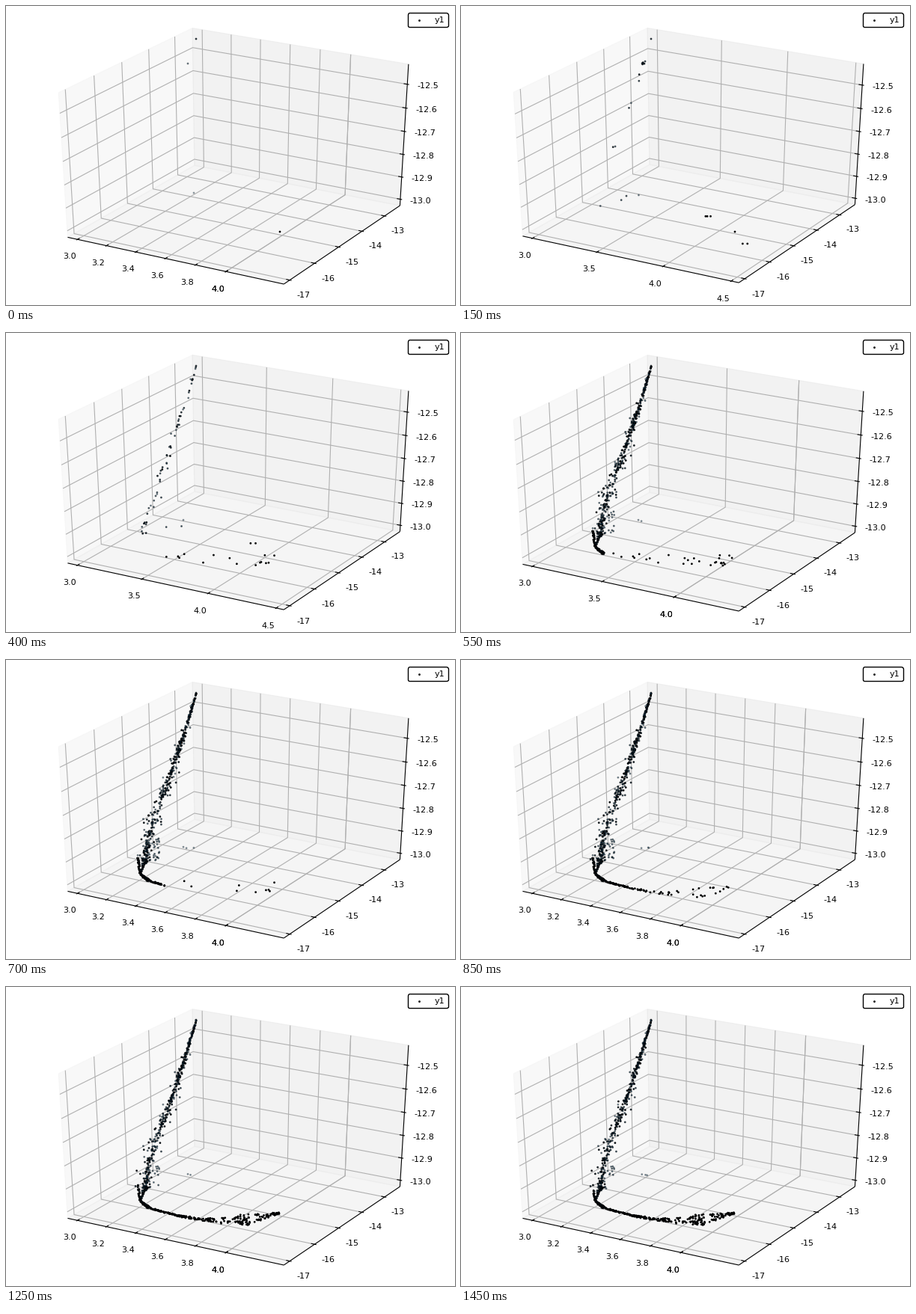
A matplotlib script for the animation above (1.5 s loop, 600 px wide and 400 px high).

```python
import numpy as np
import matplotlib.pyplot as plt
from matplotlib.animation import FuncAnimation
from matplotlib.collections import LineCollection
from matplotlib.patches import Polygon

W, H, FRAMES, STEP = 600, 400, 30, 50
MARGIN = 3.94           # one millimetre at 100 dpi
EDGE = 0.0472           # gap between the box and the data, as a share of the box
LABEL_GAP = 0.0623
DIST = 9.6
BLUE = (0, 0.606, 0.979)
TO_EYE = np.array([0.4330, -0.75, 0.5])
RIGHT = np.array([0.8660, 0.5, 0.0])
UP = np.array([-0.25, 0.4330, 0.8660])
PANES = [("0.95", [(0, 0, 0), (0, 1, 0), (0, 1, 1), (0, 0, 1)]),
         ("0.90", [(0, 1, 0), (1, 1, 0), (1, 1, 1), (0, 1, 1)]),
         ("0.925", [(0, 0, 0), (1, 0, 0), (1, 1, 0), (0, 1, 0)])]
AXES = [[(0, 0, 0), (1, 0, 0)], [(1, 0, 0), (1, 1, 0)], [(1, 1, 0), (1, 1, 1)]]

plt.rcParams["font.family"] = "DejaVu Sans"
rng = np.random.default_rng(7)

# ---- point cloud: rows of x, y, alpha, birth, death ----
cloud = []


def add(x, y, alpha, birth, death=FRAMES):
    cols = np.broadcast_arrays(x, y, alpha, birth, death)
    cloud.append(np.column_stack([np.ravel(c).astype(float) for c in cols]))


def spine(y):
    return np.interp(y, [44, 105, 160, 212, 245, 275],
                     [254.5, 236.5, 218, 198, 190, 184])


def add_upper(n, birth, death):
    """Slanted branch: a tight core inside a looser halo."""
    y = 44 + 230 * rng.random(n)
    spread = np.interp(y, [44, 90, 140, 220, 275], [0.3, 1.6, 3.2, 4.8, 3.5])
    spread *= np.where(rng.random(n) < 0.5, 0.4, 1.25)
    x = spine(y) + rng.normal(0, 1, n) * spread - 0.2 * spread
    add(x, y, rng.uniform(.45, .95, n), birth, death)


def add_early(x, y, alpha):
    n = len(x)
    add(x, y, alpha, rng.integers(1, 6, n), rng.integers(6, 11, n))


def add_bend():
    y = rng.uniform(265, 296, 70)
    x = np.interp(y, [265, 280, 288, 296], [176.5, 178, 181, 190])
    fading = np.where(y < 276, rng.uniform(14, 32, 70), FRAMES)
    add(x + rng.normal(0, .6, 70), y, .9, rng.uniform(8, 11, 70), fading)
    t = rng.random(35)
    add(189 - 9 * t + rng.normal(0, 1.2, 35), 266 + 17 * t, .8,
        rng.uniform(8, 11, 35))


def add_band():
    """Lower branch, filled outwards from the bend, then at random."""
    x = np.concatenate([rng.uniform(180, 235, 110), rng.uniform(235, 300, 85),
                        rng.uniform(300, 366, 105)])
    knots = [180, 195, 235, 262, 290, 322, 345, 366]
    low = np.interp(x, knots, [286, 297, 308, 313, 317, 319, 311, 303])
    high = np.interp(x, knots, [286, 296.5, 306, 310, 308, 304, 303, 301])
    n = len(x)
    birth = np.where(x < 235, 9 + 8 * (x - 180) / 55 + 2 * rng.random(n),
                     rng.uniform(14, 26, n))
    y = low + (high - low) * rng.random(n) + rng.normal(0, .3, n)
    add(x, y, np.clip(.85 + (x - 180) / 300, 0, 1), birth)


def add_far():
    n = 34
    add(rng.uniform(186, 205, n), rng.uniform(238, 270, n),
        rng.uniform(.38, .6, n), rng.uniform(8, 14, n), rng.uniform(14, 40, n))
    birth = np.arange(8, FRAMES, 3)
    add(rng.uniform(236, 251, len(birth)), rng.normal(251, .8, len(birth)),
        .4, birth, birth + 7)


add([254, 243, 251, 366], [44, 77, 250, 302], [.75, .5, .35, 1], 0,
    [FRAMES, 4, 3, 4])

y = np.concatenate([rng.normal(77, 3, 7), rng.uniform(46, 225, 11)])
add_early(spine(y) + rng.normal(0, 1.5, 18), y, rng.uniform(.45, .9, 18))
x = rng.uniform(172, 246, 14)
add_early(x, 264 - (x - 172) / 5 + rng.normal(0, 6, 14), rng.uniform(.4, .8, 14))
t = rng.integers(0, 4, 8) / 3
add_early(311 + 66 * t + rng.normal(0, 4, 8), 263 + 55 * t, 1)

x = np.concatenate([rng.uniform(195, 367, 20), rng.normal(348, 4, 8)])
y = np.interp(x, [195, 250, 330, 367], [294, 304, 304, 303])
add(x, y + rng.normal(0, 5, 28), 1, rng.integers(7, 12, 28),
    rng.integers(12, 16, 28))

# one half of the branch lasts, the other is renewed once
swap = rng.uniform(12, FRAMES, 200)
add_upper(220, 6 + 5 * np.sqrt(rng.random(220)), FRAMES)
add_upper(200, 6 + 5 * np.sqrt(rng.random(200)), swap)
add_upper(200, swap, FRAMES)
add_bend()
add_band()
add_far()
cloud = np.vstack(cloud)


# ---- drawing ----
def settings(i):
    """Largest x and z, x tick step, last x tick and plot height."""
    if 1 <= i < 9:
        return 4.478, -12.440, 0.5, 4.5, H - 2 * MARGIN - 2
    x_max, step = (4.365, 0.5) if 9 <= i < 12 else (4.305, 0.2)
    return x_max, -12.4456, step, 4.0, H - 2 * MARGIN


def share(v, low, high):
    return EDGE + (1 - 2 * EDGE) * (v - low) / (high - low)


def make_projection(height):
    """Map unit-box points to stage pixels."""
    sx, sy = (W - 2 * MARGIN) / 0.185, height / 0.185

    def project(p):
        p = np.asarray(p, float) - 0.5
        d = DIST - p @ TO_EYE
        return (MARGIN + sx * (0.095 + p @ RIGHT / d),
                MARGIN + sy * (0.09 - p @ UP / d))
    return project


def draw_box(i):
    x_max, z_max, step, last, height = settings(i)
    project = make_projection(height)
    grid, ticks = [], []

    def path(points):
        return [project(p) for p in points]

    def tick(text, start, direction, away, line):
        start, direction = np.array(start), np.array(direction)
        grid.append(path(line))
        ticks.append(path([start + .008 * direction, start - .016 * direction]))
        x, y = project(start + LABEL_GAP * np.array(away))
        ax.text(x, y, text, fontsize=8, ha="center", va="top")

    for grey, corners in PANES:
        ax.add_patch(Polygon(path(corners), fc=grey, ec=grey, alpha=0.5, lw=0.8))

    x_ticks = list(np.arange(3.0, last + 0.01, step))
    if last == 4.0:
        x_ticks.append(last)    # the last tick is drawn twice
    for v in x_ticks:
        t = share(v, 3.0, x_max)
        tick(f"{v:.1f}", (t, 0, 0), (0, -1, 0), (0, -1, -1),
             [(t, 0, 0), (t, 1, 0), (t, 1, 1)])
    for v in range(-17, -12):
        t = share(v, -17, -12.538)
        tick(str(v), (1, t, 0), (1, 0, 0), (1, 0, -1),
             [(0, t, 1), (0, t, 0), (1, t, 0)])
    for v in np.arange(-13.0, -12.45, 0.1):
        t = share(v, -13.0, z_max)
        tick(f"{v:.1f}", (1, 1, t), (1, 0, 0), (1, 1, 0),
             [(0, 0, t), (0, 1, t), (1, 1, t)])

    for lines, color in ((grid, "#b0b0b0"), (map(path, AXES), "k"), (ticks, "k")):
        ax.add_collection(LineCollection(list(lines), colors=color,
                                         linewidths=0.8))


def draw_points(i):
    alive = cloud[(cloud[:, 3] <= i) & (i < cloud[:, 4])]
    face = np.tile((*BLUE, 1.0), (len(alive), 1))
    edge = np.tile((0.0, 0.0, 0.0, 1.0), (len(alive), 1))
    face[:, 3] = edge[:, 3] = alive[:, 2]
    ax.scatter(alive[:, 0], alive[:, 1], s=1, c=face, edgecolors=edge,
               linewidths=1, zorder=3)


def draw_legend():
    dot = ax.scatter([], [], s=1, facecolors="k", edgecolors="k", linewidths=1)
    ax.legend([dot], ["y1"], loc="upper right", fontsize=8, scatterpoints=1,
              bbox_to_anchor=(W - MARGIN, MARGIN), bbox_transform=ax.transData,
              edgecolor="k", framealpha=1)


def draw(i):
    ax.clear()
    ax.set_axis_off()
    ax.set_xlim(0, W)
    ax.set_ylim(H, 0)
    draw_box(i)
    draw_points(i)
    draw_legend()
    return []


fig = plt.figure(figsize=(W / 100, H / 100), dpi=100, facecolor="white")
ax = fig.add_axes([0, 0, 1, 1])
anim = FuncAnimation(fig, draw, frames=FRAMES, init_func=lambda: [],
                     interval=STEP, repeat=True, repeat_delay=0)
plt.show()
```
